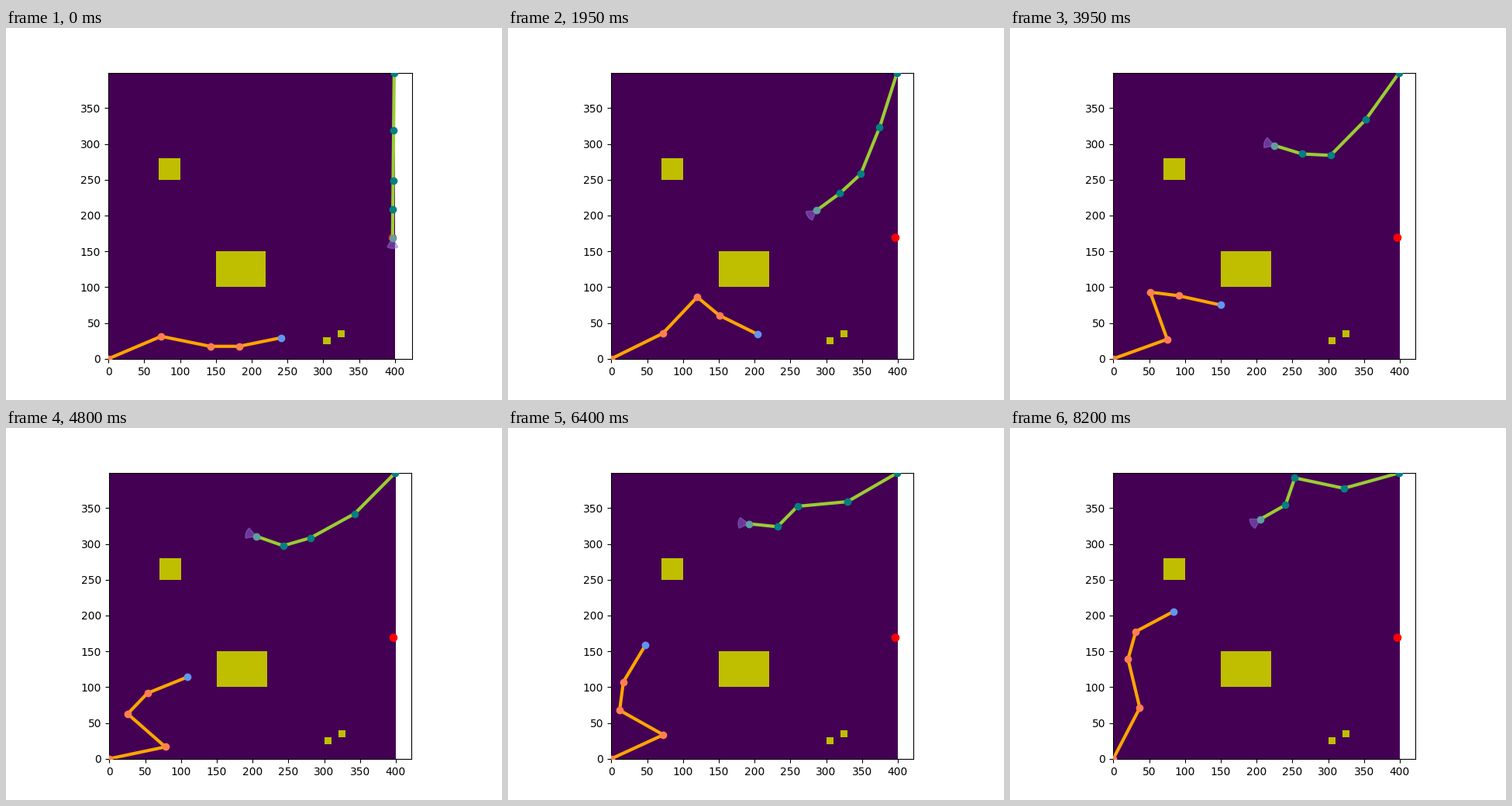
Animation, 640 px wide and 480 px high, one loop 8.25 s. Source, as a matplotlib script:

```python
import numpy as np
import matplotlib.pyplot as plt
from matplotlib.animation import FuncAnimation
from matplotlib.patches import Circle, Rectangle, Wedge

FRAMES = 165
SIZE = 400
GOAL = (396.8, 169)
SIGHT, SPREAD = 15, 30

fig = plt.figure(figsize=(6.4, 4.8), dpi=100)
ax = fig.add_subplot()
ax.imshow(np.zeros((SIZE, SIZE)), cmap="viridis", origin="lower", vmin=0, vmax=1)
ax.set_autoscale_on(False)


def block(x, y, w, h):
    ax.add_patch(Rectangle((x, y), w, h, fc="y", ec="none"))


block(150, 100, 70, 50)
block(70, 250, 30, 30)
block(300, 20, 10, 10)
block(320, 30, 10, 10)
ax.add_patch(Circle(GOAL, 5, color="red"))
cone = Wedge(GOAL, SIGHT, 0, 2 * SPREAD, color="mediumpurple", alpha=0.5)
ax.add_patch(cone)


def even_pace(poses):
    """Waypoint times for a constant speed in joint space over the loop."""
    dist = np.linalg.norm(np.diff(poses, axis=0), axis=1)
    path = np.append(0, np.cumsum(dist))
    return path / path[-1] * (FRAMES - 1)


class Arm:
    """Planar chain whose relative joint angles run straight between waypoints."""

    def __init__(self, base, links, poses, colors, times=None):
        self.base, self.links = np.array(base), np.array(links)
        self.poses = np.array(poses)
        self.times = even_pace(poses) if times is None else times
        line, joint, tip = colors
        self.line, = ax.plot([], [], color=line, lw=3)
        self.joints, = ax.plot([], [], "o", color=joint, zorder=3)
        self.tip, = ax.plot([], [], "o", color=tip, zorder=3)

    def move(self, t):
        """Pose the arm at time t; return the tip and its heading in degrees."""
        angles = np.cumsum([np.interp(t, self.times, p) for p in self.poses.T])
        a = np.radians(angles)
        steps = self.links[:, None] * np.column_stack([np.cos(a), np.sin(a)])
        pts = self.base + np.vstack([np.zeros(2), np.cumsum(steps, axis=0)])
        self.line.set_data(*pts.T)
        self.joints.set_data(*pts[:-1].T)
        self.tip.set_data(*pts[-1:].T)
        return pts[-1], angles[-1]


left_arm = Arm((0, 0), (80, 70, 40, 60),
               [(23, -34.5, 11.5, 11.5),
                (28, 52, -142.5, 14.5),
                (5, 159, -71, -41),
                (18, 141, -75, -19.5),
                (62.5, 41, -29, -46.5)],
               ("orange", "coral", "cornflowerblue"))
right_arm = Arm((SIZE - 1, SIZE - 1), (80, 70, 40, 40),
                [(-90.55, 0, 0, 0),
                 (-125, -8.5, -50.5, -13),
                 (-143.5, -23.5, 21, -55.5),
                 (-164.5, -27.5, 83, -41.5)],
                ("yellowgreen", "teal", "cadetblue"),
                times=(0, 78, 112, FRAMES - 1))


def update(i):
    left_arm.move(i)
    tip, heading = right_arm.move(i)
    cone.set_center(tip)
    cone.set_theta1(heading - SPREAD)
    cone.set_theta2(heading + SPREAD)
    # 5% margin to the right of the goal or the cone
    reach = tip[0] + SIGHT * np.cos(np.radians(heading + SPREAD))
    right = max(GOAL[0] + 5, reach)
    ax.set_xlim(-0.5, 1.05 * (right + 0.5) - 0.5)
    return []


anim = FuncAnimation(fig, update, frames=FRAMES, interval=50,
                     repeat=True, repeat_delay=0, blit=False)
plt.show()
```
